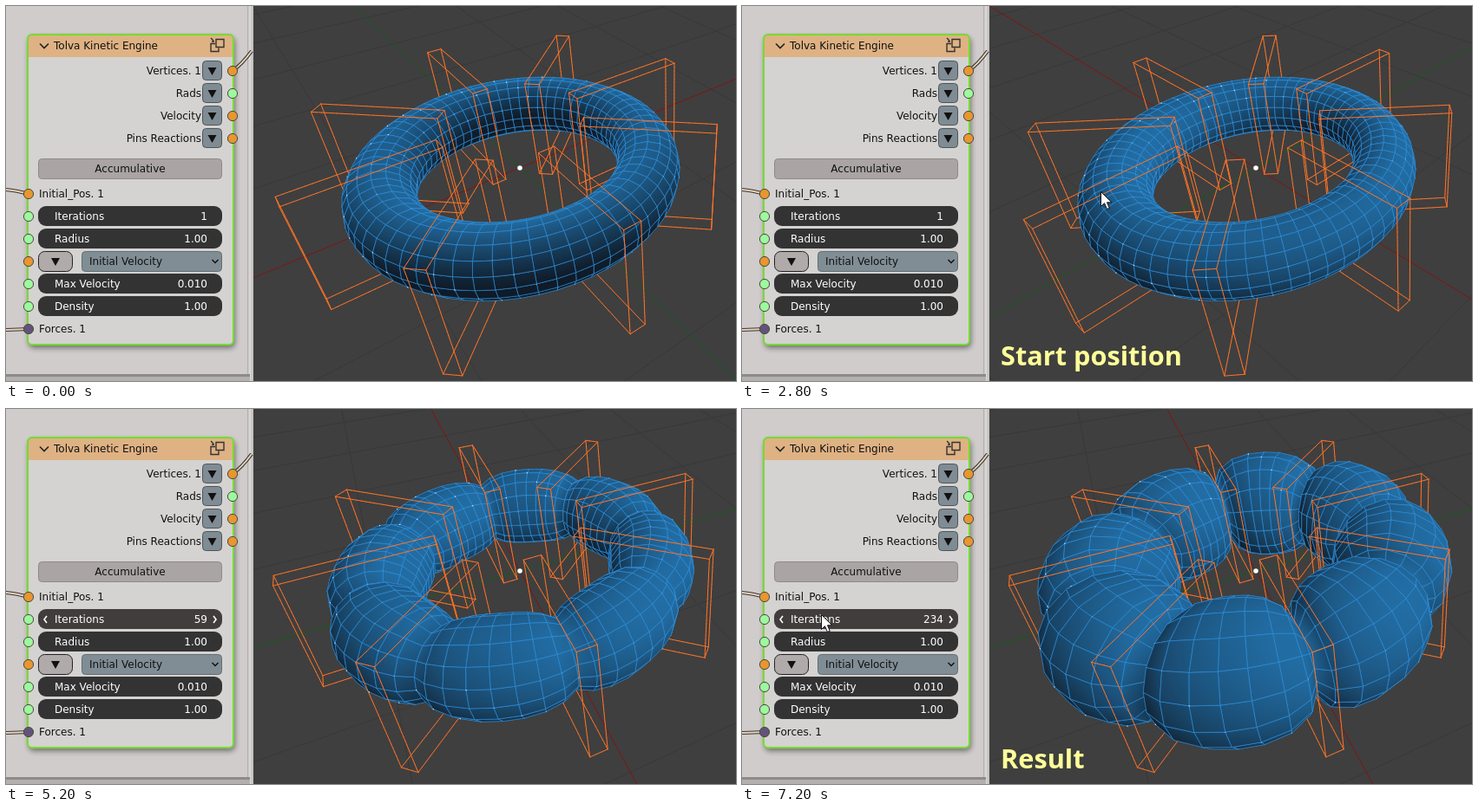
Animation of 841 by 433 pixels, one loop 8000 ms. Source, as an HTML page with a canvas:

```html
<!DOCTYPE html>
<html lang="en">
<head>
<meta charset="utf-8">
<title>Inflating ring</title>
<style>
  html, body { margin: 0; width: 841px; height: 433px; overflow: hidden; background: #3f3f3f; }
  canvas, svg { position: absolute; left: 0; top: 0; display: block; }
  .ui { font: 12px "DejaVu Sans", sans-serif; }
  .big { font: bold 30.7px "Open Sans", "Noto Sans", sans-serif; fill: #ffff99; }
</style>
</head>
<body>
<canvas id="view" width="841" height="433"></canvas>
<svg id="panel" width="841" height="433" viewBox="0 0 841 433"></svg>
<script>
const LOOP = 8000, STEP = 100, RAD = Math.PI / 180;
const ORANGE = '#e8962f', GREEN = '#9cf99c', PURPLE = '#62537a';

// ---- timeline: [time, ...values], linear in between ----
const turn = [[1200, 39.4], [2200, -7.8], [3200, -61.5]];
const count = [[4100, 1], [4600, 25], [5800, 93], [7200, 234]];
const pointer = [[100, 0, 420], [500, 800, 106], [800, 627, 213], [1200, 627, 213],
  [2200, 497, 213], [3200, 357, 214], [3500, 357, 214], [4000, 91, 237]];

function at(keys, t) {
  if (t <= keys[0][0]) return keys[0].slice(1);
  for (let i = 1; i < keys.length; i++) {
    const a = keys[i - 1], b = keys[i];
    if (t <= b[0]) {
      const f = (t - a[0]) / (b[0] - a[0]);
      return a.slice(1).map((v, n) => v + (b[n + 1] - v) * f);
    }
  }
  return keys[keys.length - 1].slice(1);
}

// ---- node panel ----
const box = (x, y, w, h, fill, r = 0, more = '') =>
  `<rect x="${x}" y="${y}" width="${w}" height="${h}" rx="${r}" fill="${fill}" ${more}/>`;
const text = (x, y, s, fill = '#111', anchor = 'start', more = '') =>
  `<text class="ui" x="${x}" y="${y}" fill="${fill}" text-anchor="${anchor}" ${more}>${s}</text>`;
const line = (d, color, w, more = '') =>
  `<path d="${d}" fill="none" stroke="${color}" stroke-width="${w}" ${more}/>`;
const dot = (x, y, fill) =>
  `<circle cx="${x}" cy="${y}" r="5.6" fill="${fill}" stroke="#4a4a40" stroke-width="1"/>`;
const wire = d => line(d, '#3a3632', 4) + line(d, '#e3d3bd', 2);
const drop = (x, y) => `<path d="M${x - 5} ${y - 4}h10l-5 9z" fill="#111"/>`;

function output(y, label, color) {
  return text(225, y + 4, label, '#111', 'end') +
    box(226.5, y - 11.5, 22, 22, '#808c94', 4, 'stroke="#4d555a"') +
    drop(237.5, y) + dot(261, y, color);
}

function field(y, label, value, id = '') {
  return box(37, y - 12, 212, 23, '#343333', 9, id && `id="${id}Box"`) +
    text(56, y + 4, label, '#fff') +
    text(232, y + 4, value, '#fff', 'end', id && `id="${id}"`) + dot(26, y, GREEN);
}

const panel = document.getElementById('panel');
panel.innerHTML = `
  <defs><filter id="soft" x="-10%" y="-10%" width="120%" height="120%"><feGaussianBlur stdDeviation="3"/></filter></defs>
  ${box(0, 0, 285, 433, '#d1cccc')}
  ${box(278, 0, 1.5, 426, '#b3aeae')}${box(279.5, 0, 3, 433, '#d9d6d6')}${box(282.5, 0, 2.5, 433, '#c6c3c3')}
  ${box(0, 425, 281, 3, '#8d8a8a')}${box(0, 428, 281, 5, '#b4b0b0')}
  ${wire('M0 212Q12 213 26 217')}${wire('M0 374L26 373')}${wire('M261 75Q272 67 283 52')}
  ${box(26, 36, 238, 359, '#000', 6, 'opacity=".45" filter="url(#soft)"')}
  ${box(25, 33, 237, 358, '#d4d3d1', 5)}
  <path d="M25 59V38q0-5 5-5h227q5 0 5 5V59z" fill="#dfb284"/>
  ${box(25, 33, 237, 358, 'none', 5, 'stroke="#73dc2e" stroke-width="2"')}
  ${line('M39 43.5l5 5 5-5', '#222', 1.6)}
  ${text(55, 50, 'Tolva Kinetic Engine')}
  ${line('M242 38.5h9v9h-9zM241 43.5h-5v9h9v-4M236 37l3 3M237 41h3', '#333', 1.4)}
  ${output(75, 'Vertices. 1', ORANGE)}${output(101, 'Rads', GREEN)}
  ${output(127, 'Velocity', ORANGE)}${output(153, 'Pins Reactions', ORANGE)}
  ${box(37.5, 176.5, 211, 23, '#aaa4a4', 4, 'stroke="#8f8989"')}
  ${text(143, 192, 'Accumulative', '#111', 'middle')}
  ${text(38, 221, 'Initial_Pos. 1')}${dot(26, 217, ORANGE)}
  ${field(243, 'Iterations', '1', 'iter')}
  <g id="arrows">${line('M47 239l-3 4 3 4M239 239l3 4-3 4', '#fff', 1.6)}</g>
  ${field(269, 'Radius', '1.00')}
  ${box(37.5, 283.5, 39, 23, '#b0aaaa', 7, 'stroke="#222"')}${drop(57, 295)}
  ${box(87.5, 283.5, 161, 23, '#808d95', 4, 'stroke="#646e74"')}
  ${text(96, 299, 'Initial Velocity')}${line('M237.5 293l3.5 3.5 3.5-3.5', '#111', 1.5)}${dot(26, 295, ORANGE)}
  ${field(321, 'Max Velocity', '0.010')}${field(347, 'Density', '1.00')}
  ${text(38, 377, 'Forces. 1')}${dot(26, 373, PURPLE)}
  <text id="start" class="big" x="298" y="415">Start position</text>
  <text id="result" class="big" x="298" y="415">Result</text>
  <path id="cursor" d="M0 0V17L4 13.2 7 20 9.8 18.8 7 12.3H12.4Z" fill="#fff" stroke="#111" stroke-width="1"/>`;

const el = id => document.getElementById(id);
const show = (id, on) => el(id).setAttribute('visibility', on ? 'visible' : 'hidden');

// ---- camera: orbits the origin, which stays at one screen point ----
const ctx = el('view').getContext('2d');
const OX = 592, OY = 187, SCALE = 149.5;

function project([x, y, z]) {
  const w = 1 + 0.1873 * y - 0.1301 * z;
  return [OX + SCALE * (x + 0.218 * y - 0.151 * z) / w,
          OY - SCALE * (0.593 * y + 0.816 * z) / w, w];
}
const polar = (r, deg, side = 0, z = 0) => {
  const c = Math.cos(deg * RAD), s = Math.sin(deg * RAD);
  return [r * c - side * s, r * s + side * c, z];
};
const sub = (a, b) => a.map((v, i) => v - b[i]);
const cross = (a, b) => [a[1] * b[2] - a[2] * b[1], a[2] * b[0] - a[0] * b[2], a[0] * b[1] - a[1] * b[0]];
const mean = list => list.reduce((a, b) => a + b) / list.length;

function stroke(points, color, width) {
  ctx.beginPath();
  points.forEach(p => ctx.lineTo(p[0], p[1]));
  ctx.strokeStyle = color;
  ctx.lineWidth = width;
  ctx.stroke();
}

// ---- floor ----
function floorLine(deg, offset, color) {
  let a = polar(-14, deg, offset), b = polar(14, deg, offset);
  const near = -4.6;
  if (a[1] < near && b[1] < near) return;
  if (a[1] > b[1]) [a, b] = [b, a];
  if (a[1] < near) {
    const f = (near - a[1]) / (b[1] - a[1]);
    a = a.map((v, i) => v + (b[i] - v) * f);
  }
  stroke([project(a), project(b)], color, 1);
}

function drawFloor(deg) {
  for (let n = -14; n <= 14; n++) {
    if (!n) continue;
    floorLine(deg, n, '#383838');
    floorLine(deg + 90, n, '#383838');
  }
  floorLine(deg, 0, '#821414');
  floorLine(deg + 90, 0, '#175a1e');
}

// ---- ring: 8 cells of 8 slices, each slice a 16-gon ----
const CELL = 8, SLICES = 8 * CELL, SIDES = 16;

function ringPoint(i, j, deg, g) {
  const k = (i % CELL) * 2 / CELL - 1, m = Math.abs(k);
  const spread = Math.sign(k) * (m + 0.8 * g * m * m * (1 - m)) * 22.5;
  const r = 0.24 + 0.225 * g * (1 - Math.pow(m, 2.6)), a = j * 360 / SIDES * RAD;
  const cell = 45 * Math.floor(i / CELL) + 22.5;
  return polar(0.99 + 0.06 * g + r * Math.cos(a), deg + cell + spread, 0, r * Math.sin(a));
}

function lightness(n, light) {
  const d = (n[0] * light[0] + n[1] * light[1] + n[2] * light[2]) / (Math.hypot(...n) || 1);
  return Math.min(1, Math.max(0, (d + 0.65) / 1.6));
}
const tone = f => `rgb(${[15, 27, 40].map((v, i) => Math.round(v + ([34, 109, 164][i] - v) * f))})`;

// Linear gradient that follows the lightness at the four corners.
function smoothFill(s, lit) {
  const e = sub(s[2], s[0]), f = sub(s[3], s[1]);
  const de = lit[2] - lit[0], df = lit[3] - lit[1];
  const det = e[0] * f[1] - e[1] * f[0];
  const gx = (de * f[1] - df * e[1]) / det, gy = (df * e[0] - de * f[0]) / det;
  const mid = mean(lit), reach = Math.max(...lit.map(v => Math.abs(v - mid)));
  const k = reach / (gx * gx + gy * gy);
  if (reach < 0.01 || !isFinite(k)) return tone(mid);
  const x = mean(s.map(p => p[0])), y = mean(s.map(p => p[1]));
  const fill = ctx.createLinearGradient(x - gx * k, y - gy * k, x + gx * k, y + gy * k);
  fill.addColorStop(0, tone(mid - reach));
  fill.addColorStop(1, tone(mid + reach));
  return fill;
}

function ringFaces(deg, g, list) {
  const light = polar(0.75, deg + 50, 0, 0.66);
  const pts = [...Array(SLICES)].map((_, i) =>
    [...Array(SIDES)].map((_, j) => ringPoint(i, j, deg, g)));
  const get = (i, j) => pts[(i + SLICES) % SLICES][(j + SIDES) % SIDES];
  const verts = pts.map((row, i) => row.map((p, j) => ({
    s: project(p),
    lit: lightness(cross(sub(get(i + 1, j), get(i - 1, j)), sub(get(i, j + 1), get(i, j - 1))), light)
  })));
  for (let i = 0; i < SLICES; i++) for (let j = 0; j < SIDES; j++) {
    const u = (i + 1) % SLICES, v = (j + 1) % SIDES;
    const quad = [verts[i][j], verts[u][j], verts[u][v], verts[i][v]];
    const s = quad.map(q => q.s);
    const e = sub(s[2], s[0]), f = sub(s[3], s[1]);
    if (e[0] * f[1] - e[1] * f[0] >= 0) continue;
    const spot = (i * 7 + j * 3) % 4 === 0;
    list.push([mean(s.map(p => p[2])), () => {
      stroke([...s, s[0]], '#2f8fda', 0.8);
      ctx.fillStyle = smoothFill(s, quad.map(q => q.lit));
      ctx.fill();
      stroke([...s, s[0]], '#2f8fda', 0.5);
      if (spot) {
        ctx.fillStyle = '#d5e9fa';
        ctx.fillRect(s[0][0] - 0.6, s[0][1] - 0.6, 1.2, 1.2);
      }
    }]);
  }
}

// ---- eight wire plates, edges cut short so they sort against the ring ----
function plateEdges(deg, list) {
  const corner = (n, a) => polar(n & 1 ? 1.495 : 0.525, a, n & 2 ? 0.06 : -0.06, n & 4 ? 0.445 : -0.445);
  for (let a = 0; a < 360; a += 45) for (let n = 0; n < 8; n++) for (const bit of [1, 2, 4]) {
    if (n & bit) continue;
    const p = corner(n, deg + a), d = sub(corner(n | bit, deg + a), p);
    const parts = bit === 2 ? 3 : 24;
    const pt = f => project(p.map((v, i) => v + d[i] * f));
    for (let k = 0; k < parts; k++) {
      const s = pt(k / parts), e = pt((k + 1) / parts);
      list.push([(s[2] + e[2]) / 2, () => stroke([s, e], '#ff7326', 1)]);
    }
  }
}

function draw(t) {
  const [deg] = at(turn, t);
  const n = Math.round(at(count, t)[0]);
  const x = (n - 1) / 233;
  const g = Math.pow(x * (2 - x), 1.1);

  ctx.fillStyle = '#3f3f3f';
  ctx.fillRect(0, 0, 841, 433);
  ctx.lineJoin = ctx.lineCap = 'round';
  drawFloor(deg);
  const list = [];
  ringFaces(deg, g, list);
  plateEdges(deg, list);
  list.sort((a, b) => b[0] - a[0]).forEach(item => item[1]());
  ctx.beginPath();
  ctx.arc(OX, OY, 2.8, 0, 7);
  ctx.fillStyle = '#fff';
  ctx.fill();

  const hover = t >= 3900;
  el('iter').textContent = n;
  el('iterBox').setAttribute('fill', hover ? '#413d3d' : '#343333');
  show('arrows', hover);
  show('start', t >= 400 && t < 4200);
  show('result', t >= 7200);
  show('cursor', t >= 100 && t < 4200 || t >= 7200);
  el('cursor').setAttribute('transform', `translate(${at(pointer, t).map(v => Math.round(v) + 0.5)})`);
}

let last = -1;
function tick() {
  const t = Math.floor(performance.now() % LOOP / STEP) * STEP;
  if (t !== last) draw(last = t);
  requestAnimationFrame(tick);
}
tick();
</script>
</body>
</html>
```
